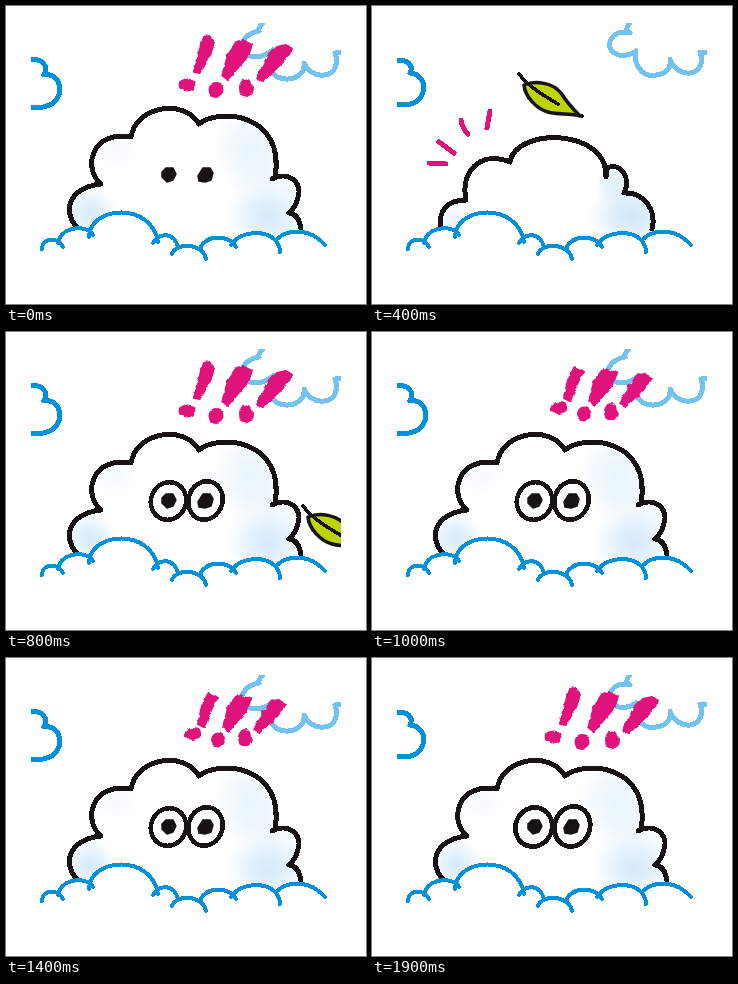
These frames come from a looping animation (360 by 298 pixels, 2 s). An HTML page:

```html
<!DOCTYPE html>
<html lang="en">
<head>
<meta charset="utf-8">
<title>Cloud and leaf</title>
<style>
html, body { margin: 0; width: 100%; height: 100%; overflow: hidden; background: #fff; }
svg { display: block; width: 100vw; height: 100vh; }
.line { fill: none; stroke-linecap: round; stroke-linejoin: round; shape-rendering: crispEdges; }
.ink { stroke: #171314; stroke-width: 5; }
.pink { stroke: #e0127c; fill: #e0127c; stroke-width: 2; stroke-linejoin: round; }
</style>
</head>
<body>
<svg viewBox="0 0 360 298">
  <defs>
    <clipPath id="stage"><rect x="25" y="17" width="310" height="260"/></clipPath>
    <radialGradient id="tint">
      <stop offset="0" stop-color="#cfe7f9"/>
      <stop offset=".5" stop-color="#d6ebfa" stop-opacity=".7"/>
      <stop offset="1" stop-color="#e6f3fc" stop-opacity="0"/>
    </radialGradient>
    <filter id="rough" x="0" y="0" width="360" height="298" filterUnits="userSpaceOnUse" color-interpolation-filters="sRGB">
      <feTurbulence type="fractalNoise" baseFrequency=".16" numOctaves="2" seed="4"/>
      <feDisplacementMap in="SourceGraphic" scale="4" xChannelSelector="R" yChannelSelector="G"/>
    </filter>
    <clipPath id="bigClip"><path id="bigFill"/></clipPath>
    <clipPath id="lowClip"><path id="lowFill"/></clipPath>
  </defs>
  <g clip-path="url(#stage)">
    <path id="left" class="line" stroke="#0091dc" stroke-width="5"/>
    <path id="right" class="line" stroke="#73c3f1" stroke-width="5"/>

    <g id="low">
      <g clip-path="url(#lowClip)" fill="url(#tint)">
        <ellipse cx="242" cy="180" rx="20" ry="24" opacity=".7"/>
        <ellipse cx="260" cy="210" rx="46" ry="36"/>
        <ellipse cx="83" cy="216" rx="24" ry="22" opacity=".4"/>
      </g>
      <path id="lowLine" class="line ink"/>
    </g>

    <g id="big">
      <g clip-path="url(#bigClip)" fill="url(#tint)">
        <ellipse cx="244" cy="142" rx="40" ry="46" opacity=".45"/>
        <ellipse cx="262" cy="182" rx="44" ry="50" opacity=".3"/>
        <ellipse cx="262" cy="212" rx="42" ry="36" opacity=".85"/>
        <ellipse cx="84" cy="207" rx="28" ry="28" opacity=".85"/>
        <ellipse cx="110" cy="145" rx="28" ry="24" opacity=".15"/>
      </g>
      <path id="bigLine" class="line ink"/>
      <g id="eyes">
        <g id="rims" class="line" stroke="#171314" stroke-width="4.600">
          <ellipse cx="162.500" cy="169" rx="17.500" ry="19" transform="rotate(22 162.500 169)"/>
          <ellipse cx="199.500" cy="168.500" rx="17" ry="19.500" transform="rotate(18 199.500 168.500)"/>
        </g>
        <path fill="#171314" d="M160 162 L167 162 L170 168 L167 174 L161 176 L156 171 L156 166Z M197 162 L204 162 L207 167 L205 174 L199 176 L193 175 L192 170Z" stroke="#171314" stroke-width="1.500" stroke-linejoin="round"/>
      </g>
    </g>

    <g class="line" stroke="#0091dc" stroke-width="4">
      <path fill="#fff" stroke="none" d="M36 243 C36 232 49 230 54 236 C56 220 80 219 86 228 C88 200 142 197 152 233 C158 226 168 228 172 240 C182 236 193 239 198 243 C202 229 222 228 228 237 C240 224 262 224 271 233 C284 222 304 222 319 239 V280 H36Z"/>
      <path d="M36 243 C36 232 51 230 57 241 M52 237 C55 219 83 219 87 229 M83 231 C84 199 146 196 152 236 M147 237 C154 226 168 226 172 241 M166 248 C170 236 197 237 200 253 M194 244 C197 229 222 227 230 241 M225 239 C235 222 273 222 274 246 M270 234 C282 222 304 222 319 239"/>
    </g>

    <g id="pops" class="line" stroke="#e0127c" stroke-width="5">
      <path d="M57 157 L74 158 M67 136 L82 147 M89 114 Q90 122 96 128 M118 105 L115 122"/>
    </g>
    <g id="bangs" class="pink" filter="url(#rough)"></g>
    <g id="leaf">
      <path d="M5 11 C17 6 34 9 42 19 C47 27 54 35 61 42 C51 39 39 41 29 38 C18 35 6 23 5 11Z" fill="#bcd400" stroke="#171314" stroke-width="3.500" stroke-linejoin="round"/>
      <path class="line" d="M0 0 C10 13 24 21 39 30 M59 41 L63 42" stroke="#171314" stroke-width="3.500"/>
    </g>
  </g>
</svg>
<script>
const $ = id => document.getElementById(id);
const show = (id, on) => $(id).setAttribute('display', on ? 'inline' : 'none');
const move = (id, x, y) => $(id).setAttribute('transform', `translate(${x} ${y})`);

const bigPath = 'M71 221 C57 207 61 182 95 178 C76 162 86 124 125 131 C130 100 178 92 193 118 C212 102 280 106 269 172 L266 173 C282 164 297 177 292 191 C290 200 287 204 283 207 C291 208 294 215 295 223';
const lowPath = 'M69 221 C66 204 76 194 94 194 C88 166 108 144 138 156 C144 121 236 122 234 171 L235 162 C248 156 260 171 252 187 C272 186 285 204 280 223';
for (const [name, d] of [['big', bigPath], ['low', lowPath]]) {
  $(name + 'Line').setAttribute('d', d);
  $(name + 'Fill').setAttribute('d', d + 'V245H70Z');
}

// Two hand-drawn poses of the side clouds
const sides = [
  ['M25 54 C36 52 43 60 38 69 C50 67 56 78 53 89 C49 99 38 103 25 101',
   'M256 18 C253 21 252 23 253 25 C236 28 230 44 241 49 C250 53 260 50 267 44 C258 58 266 74 282 73 C293 72 299 66 298 57 C303 70 318 71 325 67 C331 62 332 54 329 47 L335 46'],
  ['M25 55 C35 53 42 59 38 67 C48 67 54 78 51 86 C48 97 36 101 25 98',
   'M257 18 C254 21 254 25 258 27 C240 22 232 40 242 47 C248 51 257 50 264 45 C261 58 270 72 284 69 C294 68 300 62 298 53 C303 68 318 69 324 65 C330 60 331 54 328 46 L336 46']
];

// Two poses of the exclamation marks: bar outline, then its dot
const longBangs = [
  ['198 31 203 30 208 36 205 47 194 67 188 66 193 46', [181, 79, 7.5, 5.5]],
  ['231 36 236 34 246 39 242 50 222 73 216 70 222 49', [210, 84, 6.5, 7]],
  ['271 41 280 39 286 43 277 56 257 75 251 72 262 50', [240, 82, 6, 8.5]]
];
const shortBangs = [
  ['202 36 211 40 206 50 198 69 192 66 196 48', [187, 76, 7.5, 5]],
  ['232 37 245 41 240 53 223 73 217 69 222 50', [212, 82, 6, 6.5]],
  ['266 43 273 42 280 46 272 57 254 74 248 71 258 53', [239, 80, 6, 8]]
];
const drawBang = ([bar, [x, y, rx, ry]]) =>
  `<polygon points="${bar}"/><ellipse cx="${x}" cy="${y}" rx="${rx}" ry="${ry}"/>`;

// The leaf drifts down to the right and slows slightly
function leafAt(step) {
  const k = (step - 6) / 2;
  return [228 + 75 * k - 6 * k * k, 122 + 53 * k - k * k];
}

function render(step) {
  const intro = step > 0 && step < 8;
  const rising = step > 0 && step < 5;
  const pose = sides[intro ? (step + 1) % 2 : step % 2];
  $('left').setAttribute('d', pose[0]);
  $('right').setAttribute('d', pose[1]);

  show('low', rising);
  show('big', !rising);
  move('low', 0, rising ? 5 * (4 - step) * (5 - step) : 0);
  show('pops', step === 4);

  show('rims', step >= 8);
  const grow = step % 2 ? 1.04 : 1;
  $('rims').setAttribute('transform', `translate(181 169) scale(${grow}) translate(-181 -169)`);

  const count = intro ? Math.max(0, step - 5) : rising ? 0 : 3;
  const bangs = step >= 10 && step % 2 === 0 ? shortBangs : longBangs;
  $('bangs').innerHTML = bangs.slice(0, count).map(drawBang).join('');

  show('leaf', step > 0 && step < 10);
  move('leaf', ...leafAt(step));
}

const start = performance.now();
let last = -1;
function tick(now) {
  const step = Math.floor((Math.max(0, now - start) % 2000) / 100);
  if (step !== last) render(last = step);
  requestAnimationFrame(tick);
}
render(0);
requestAnimationFrame(tick);
</script>
</body>
</html>
```
